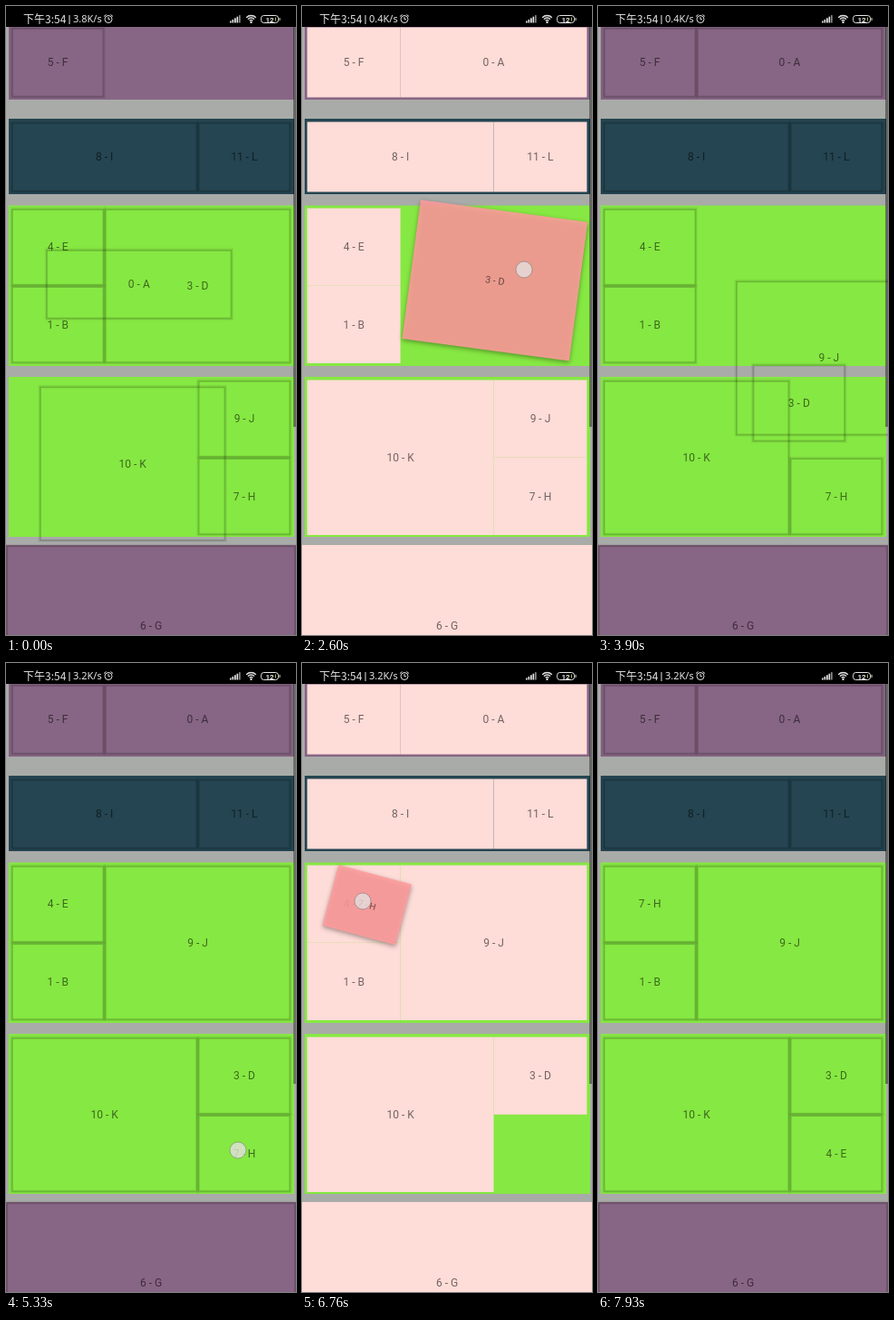
An HTML page with a canvas for the animation above (8000 ms loop, 320 by 692 pixels).

```html
<!DOCTYPE html>
<html lang="zh">
<head>
<meta charset="utf-8">
<title>Drag to swap</title>
<style>
html, body { margin: 0; width: 100%; height: 100%; overflow: hidden; background: #a9aba8; }
canvas { display: block; width: 320px; height: 692px; }
</style>
</head>
<body>
<canvas></canvas>
<script>
const W = 320, H = 692, LOOP = 8000, MOVE = 1000;
const canvas = document.querySelector('canvas');
const ratio = window.devicePixelRatio || 1;
canvas.width = W * ratio;
canvas.height = H * ratio;
const ctx = canvas.getContext('2d');

const PURPLE = '#876584', NAVY = '#244551', GREEN = '#86e842', PINK = '#fedcd8';
const panels = [
  [3, 20, 315, 83, PURPLE], [3, 124, 315, 83, NAVY],
  [3, 219.5, 315, 176.5, GREEN], [3, 408, 315, 176, GREEN], [0, 593, 320, 178, PURPLE]
];

// Slots sit on a three-column grid: column, top, columns spanned, height
const COL = 102.9, ROW = 85.25;
const cell = (col, y, span, h) => ({ x: 5.7 + col * COL, y, w: span * COL, h });
const slots = [
  cell(0, 23.5, 1, 77), cell(1, 23.5, 2, 77),
  cell(0, 127.5, 2, 77), cell(2, 127.5, 1, 77),
  cell(0, 222.5, 1, ROW), cell(0, 222.5 + ROW, 1, ROW), cell(1, 222.5, 2, 2 * ROW),
  cell(0, 411.5, 2, 2 * ROW), cell(2, 411.5, 1, ROW), cell(2, 411.5 + ROW, 1, ROW),
  { x: 0, y: 593, w: 320, h: 178 }
];
const startLabels = ['5 - F', '10 - K', '8 - I', '11 - L', '4 - E', '1 - B', '3 - D',
  '0 - A', '9 - J', '7 - H', '6 - G'];

// Each drag: press, lift, finger travel (go to stop), drop; press point and travel vector
const drags = [
  { press: -2100, lift: -1250, go: -1100, stop: -500, drop: -416, from: 1, to: 7, x: 212, y: 62, dx: -53.5, dy: 398.5 },
  { press: 1650, lift: 2500, go: 2650, stop: 3250, drop: 3350, from: 6, to: 8, x: 245, y: 290, dx: 5, dy: 147.5 },
  { press: 4920, lift: 5800, go: 5930, stop: 6700, drop: 6850, from: 9, to: 4, x: 256, y: 536, dx: -189, dy: -274 }
];
const scrollbarFades = [[1130, 2500], [5300, 5800]];

const clamp = v => Math.min(1, Math.max(0, v));
const ease = v => 0.5 - Math.cos(Math.PI * clamp(v)) / 2;

function text(str, x, y, font, color, align = 'center') {
  ctx.font = font;
  ctx.fillStyle = color;
  ctx.textAlign = align;
  ctx.textBaseline = 'alphabetic';
  ctx.fillText(str, x, y);
}

function fill(x, y, w, h, color) {
  ctx.fillStyle = color;
  ctx.fillRect(x, y, w, h);
}

function outline(x, y, w, h, width, color) {
  ctx.lineWidth = width;
  ctx.strokeStyle = color;
  ctx.strokeRect(x, y, w, h);
}

function label(str, s) {
  text(str, s.x + s.w / 2, s.y + s.h / 2 + 4.3, '12px Roboto, sans-serif', 'rgba(0,0,0,.55)');
}

function drawItem(str, s, pink) {
  if (pink) {
    fill(s.x, s.y, s.w, s.h, PINK);
  } else {
    outline(s.x + 0.5, s.y + 0.5, s.w - 1, s.h - 1, 3.5, 'rgba(0,0,0,.06)');
    outline(s.x + 1, s.y + 1.3, s.w - 2, s.h - 2, 1.8, 'rgba(0,0,0,.15)');
  }
  label(str, s);
}

function drawLifted(str, s, drag, finger, t) {
  const k = ease((t - drag.lift) / 200);
  ctx.save();
  ctx.translate(finger.x, finger.y);
  ctx.rotate(k * 15 * Math.PI / 180);
  ctx.scale(1 - 0.19 * k, 1 - 0.19 * k);
  ctx.translate(-drag.x, -drag.y);
  ctx.save();
  ctx.shadowColor = 'rgba(0,0,0,.4)';
  ctx.shadowBlur = 5 * ratio;
  ctx.shadowOffsetY = 2 * ratio;
  fill(s.x, s.y, s.w, s.h, 'rgba(255,157,157,.88)');
  ctx.restore();
  label(str, s);
  ctx.restore();
}

function drawFinger({ x, y }) {
  ctx.beginPath();
  ctx.arc(x, y, 9, 0, 2 * Math.PI);
  ctx.fillStyle = 'rgba(228,222,222,.8)';
  ctx.fill();
  ctx.lineWidth = 1;
  ctx.strokeStyle = 'rgba(120,120,120,.55)';
  ctx.stroke();
}

function arc(x, y, r, from, to) {
  ctx.beginPath();
  ctx.arc(x, y, r, from * Math.PI, to * Math.PI);
  ctx.stroke();
}

function drawStatus(t) {
  const white = '#e6e6e6';
  const speed = t < 400 ? '3.8' : t < 4400 ? '0.4' : '3.2';
  fill(0, 0, W, 23, '#000');
  text('下午3:54', 19, 18.5, '12px "Noto Sans CJK SC", "Noto Sans CJK", sans-serif', white, 'left');
  fill(69.5, 10, 1, 10, white);
  text(speed + 'K/s', 74, 18.3, '11px "Noto Sans", sans-serif', white, 'left');

  ctx.strokeStyle = white;
  ctx.lineWidth = 1;
  arc(113, 14.5, 4, 0, 2);
  ctx.beginPath();
  ctx.moveTo(113, 12); ctx.lineTo(113, 14.8); ctx.lineTo(115, 14.8);
  ctx.moveTo(108, 11.5); ctx.lineTo(110.5, 9.5);
  ctx.moveTo(118, 11.5); ctx.lineTo(115.5, 9.5);
  ctx.stroke();

  for (let i = 0; i < 5; i++) {
    fill(247 + i * 2.5, 16.5 - i * 1.6, 1.7, 2 + i * 1.6, i < 4 ? white : '#888');
  }
  ctx.lineWidth = 1.4;
  for (const r of [2.5, 5, 7.5]) arc(270.5, 18, r, 1.25, 1.75);
  fill(269.5, 17, 2, 2, white);

  ctx.lineWidth = 1;
  ctx.beginPath();
  ctx.roundRect(281.5, 10.5, 19, 8, 3);
  ctx.stroke();
  fill(301.5, 13, 1, 3, white);
  text('12', 291, 17.5, 'bold 8px Roboto, sans-serif', white);
  fill(297, 12.5, 1, 4, '#a8b860');
}

function draw(t) {
  ctx.setTransform(ratio, 0, 0, ratio, 0, 0);
  fill(0, 0, W, H, '#a9aba8');
  for (const p of panels) fill(...p);

  const labels = [...startLabels];
  const places = slots.map(s => ({ ...s }));
  let active = null;
  for (const d of drags) {
    if (t >= d.drop) {
      const a = slots[d.from], b = slots[d.to];
      const rest = 1 - ease((t - d.drop) / MOVE);
      [labels[d.from], labels[d.to]] = [labels[d.to], labels[d.from]];
      places[d.to].x += (a.x + d.dx - b.x) * rest;
      places[d.to].y += (a.y + d.dy - b.y) * rest;
      places[d.from].x += (b.x - a.x) * rest;
      places[d.from].y += (b.y - a.y) * rest;
    } else if (t >= d.press) {
      active = d;
    }
  }

  const lifted = active && t >= active.lift;
  places.forEach((s, i) => {
    if (!lifted || i !== active.from) drawItem(labels[i], s, lifted);
  });

  let bar = 1;
  for (const [from, back] of scrollbarFades) {
    if (t >= from && t < back) bar = 1 - clamp((t - from) / 250);
  }
  fill(317, 23, 3, 440, `rgba(0,0,0,${0.4 * bar})`);

  if (active) {
    const k = ease((t - active.go) / (active.stop - active.go));
    const finger = { x: active.x + active.dx * k, y: active.y + active.dy * k };
    if (lifted) drawLifted(labels[active.from], slots[active.from], active, finger, t);
    drawFinger(finger);
  }
  drawStatus(t);
}

function tick() {
  draw(performance.now() % LOOP);
  requestAnimationFrame(tick);
}
tick();
</script>
</body>
</html>
```
